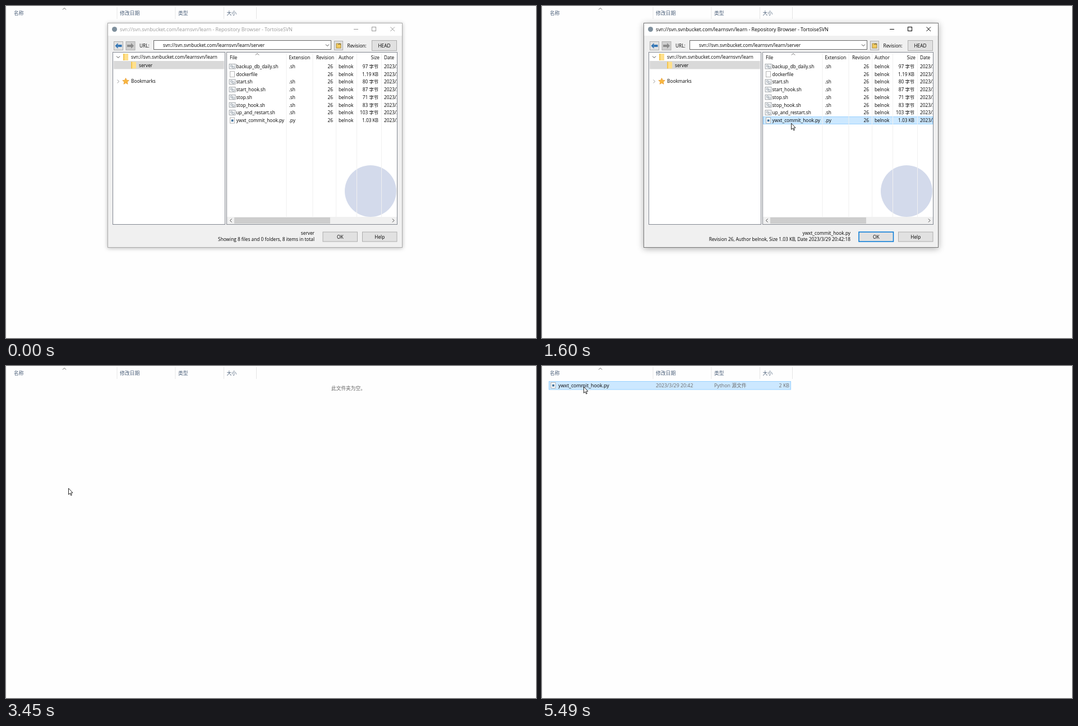
An HTML page with a canvas that plays this animation: 945x592 px, repeating every 5570 ms.

```html
<!DOCTYPE html>
<html lang="zh">
<head>
<meta charset="utf-8">
<style>
  html, body { margin: 0; width: 100%; height: 100%; overflow: hidden; background: #fefefe; }
  canvas { display: block; }
</style>
</head>
<body>
<canvas id="stage" width="945" height="592"></canvas>
<script>
const ctx = document.getElementById('stage').getContext('2d');
const LOOP = 5570, STEP = 76;
const ACTIVATE = 1210, RELEASE = 1370, GRAB = 2210, DRAG = 2380, DROP = 3450, COPIED = 3770;
const FONT = '"Open Sans", "Noto Sans CJK SC", "Noto Sans CJK", sans-serif';
const DIALOG = 8.3, SYSTEM = 8.8;
const ROW_TOP = 197, ROW_HEIGHT = 13.72;

const REPO = 'svn://svn.svnbucket.com/learnsvn/learn';
const AUTHOR = 'belnok';
const FILES = [
  ['backup_db_daily.sh', '97 字节'], ['dockerfile', '1.19 KB'],
  ['start.sh', '80 字节'], ['start_hook.sh', '87 字节'],
  ['stop.sh', '71 字节'], ['stop_hook.sh', '83 字节'],
  ['up_and_restart.sh', '103 字节'], ['ywxt_commit_hook.py', '1.03 KB']
].map(([name, size]) => ({ name, size, ext: (name.match(/\.\w+$/) || [''])[0] }));
const DRAGGED = FILES[FILES.length - 1].name;
const COLUMNS = [
  { title: 'File', width: 105.5, inset: 16.5, cell: f => f.name },
  { title: 'Extension', width: 47, cell: f => f.ext },
  { title: 'Revision', width: 41.5, align: 'right', cell: () => '26' },
  { title: 'Author', width: 37, cell: () => AUTHOR },
  { title: 'Size', width: 44, align: 'right', cell: f => f.size },
  { title: 'Date', width: 30, cell: () => '2023/3/29 20:42:18' }
];

// Each move leaves from where the one before ended; sway bows it sideways.
const MOVES = [
  { start: 230, end: 760, to: [458, 241] },
  { start: 840, end: 1060, to: [429, 208] },
  { start: 1440, end: 1980, to: [427, 207], sway: [18.5, 1.7] },
  { start: 2060, end: 2060, to: [427, 206] },
  { start: DRAG, end: 2820, to: [111, 219] },
  { start: DROP, end: DROP, to: [111, 218] },
  { start: COPIED, end: 4000, to: [161, 224] },
  { start: 4230, end: 4770, to: [63, 36], sway: [25, 8] },
  { start: 4850, end: 5340, to: [85, 48], sway: [38, 20] },
  { start: 5420, end: 5490, to: [74, 37] }
];
const ENTRY = [888, 595];

function pointerAt(t) {
  const index = MOVES.filter(m => m.start <= t).length - 1;
  if (index < 0) return null;
  const { start, end, to, sway = [0, 0] } = MOVES[index];
  const from = index ? MOVES[index - 1].to : ENTRY;
  const last = Math.round((end - start) / STEP);
  const step = last ? Math.min(last, Math.floor((t - start) / (end - start) * last + .03)) : 0;
  const u = (step + 1) / (last + 1), eased = u * u * (3 - 2 * u);
  return to.map((goal, k) =>
    Math.round(from[k] + (goal - from[k]) * eased + sway[k] * Math.sin(Math.PI * eased)));
}

function rect(x, y, w, h, fill, stroke, width = 1) {
  if (fill) { ctx.fillStyle = fill; ctx.fillRect(x, y, w, h); }
  if (stroke) { ctx.strokeStyle = stroke; ctx.lineWidth = width; ctx.strokeRect(x, y, w, h); }
}
function poly(points, stroke, fill, width = 1) {
  ctx.beginPath();
  points.forEach(([x, y]) => ctx.lineTo(x, y));
  if (fill) { ctx.closePath(); ctx.fillStyle = fill; ctx.fill(); }
  if (stroke) { ctx.strokeStyle = stroke; ctx.lineWidth = width; ctx.stroke(); }
}
function circle(x, y, r, fill, stroke) {
  ctx.beginPath();
  ctx.arc(x, y, r, 0, 7);
  if (fill) { ctx.fillStyle = fill; ctx.fill(); }
  if (stroke) { ctx.strokeStyle = stroke; ctx.lineWidth = .8; ctx.stroke(); }
}
function plus(x, y, r, color, width) {
  poly([[x - r, y], [x + r, y]], color, null, width);
  poly([[x, y - r], [x, y + r]], color, null, width);
}
function text(str, x, y, { color = '#000', size = DIALOG, align = 'left' } = {}) {
  ctx.font = `${size}px ${FONT}`;
  ctx.textAlign = align;
  ctx.fillStyle = color;
  ctx.fillText(str, x, y + 3);
}
// Chevron pointing along (dx, dy).
function chevron(x, y, dx, dy, color = '#444', r = 3) {
  const h = r / 2;
  poly([[x - dx * h - dy * r, y - dy * h - dx * r], [x + dx * h, y + dy * h],
        [x - dx * h + dy * r, y - dy * h + dx * r]], color);
}
function button(label, x, y, w, h, isDefault) {
  rect(x, y, w, h, '#e1e1e1', isDefault ? '#0078d7' : '#adadad', isDefault ? 1.5 : 1);
  text(label, x + w / 2, y + h / 2, { align: 'center' });
}
function folder(x, y) {
  rect(x, y - 6, 9, 12, '#ffe08c');
  rect(x, y - 6, 2, 12, '#f3c54f');
}
function fileIcon(name, x, y) {
  if (name.endsWith('.sh')) {
    rect(x - .5, y - 4.5, 11, 8.5, '#f4f6f7', '#8c9196', .8);
    circle(x + 3.5, y - 1, 1.6, null, '#87929d');
    circle(x + 6.7, y + 1.2, 1.8, null, '#87929d');
  } else {
    rect(x + 1, y - 5, 8, 10, '#fff', '#a0a0a0', .8);
    if (name.endsWith('.py')) rect(x + 3.2, y - 1.7, 3.8, 3.8, '#42749f');
  }
}
// Arrow button; dir is 1 for left and -1 for right.
function arrowButton(x, dir, back, color) {
  rect(x - 8, 63.5, 16, 15, back, '#adadad');
  poly([[x - 6 * dir, 71], [x - dir, 66], [x - dir, 76]], null, color);
  rect(x - (dir > 0 ? 1 : 6), 69, 7, 4, color);
}
function star(x, y, r) {
  poly(Array.from({ length: 10 }, (_, i) => {
    const angle = (i / 5 - .5) * Math.PI, reach = i % 2 ? r * .47 : r;
    return [x + reach * Math.cos(angle), y + reach * Math.sin(angle)];
  }), '#e89a2e', '#f9b73e', .8);
}

function drawExplorer(t) {
  rect(0, 0, 945, 592, '#fefefe');
  rect(0, 0, 1, 592, '#f3f3f3');
  const header = (label, x) => {
    rect(x - 5.5, 2, 1, 21, '#e5e5e5');
    text(label, x, 13, { color: '#4c607a', size: SYSTEM });
  };
  text('名称', 14, 13, { color: '#4c607a', size: SYSTEM });
  header('修改日期', 203);
  header('类型', 307);
  header('大小', 393.5);
  header('', 451.5);
  chevron(104, 5, 0, -1, '#666');
  if (t < COPIED) {
    text('此文件夹为空。', 580, 40, { color: '#666', size: 8.7 });
    return;
  }
  const grey = { color: '#6d6d6d', size: SYSTEM };
  rect(12.5, 27.5, 431, 14.5, '#cce8ff', '#99d1ff');
  fileIcon(DRAGGED, 15, 34.5);
  text(DRAGGED, 29, 34.5, { size: SYSTEM });
  text('2023/3/29 20:42', 203, 34.5, grey);
  text('Python 源文件', 307, 34.5, grey);
  text('2 KB', 441, 34.5, { ...grey, align: 'right' });
}

function drawFrame(active) {
  ctx.save();
  ctx.shadowColor = active ? 'rgba(0,0,0,.32)' : 'rgba(0,0,0,.28)';
  ctx.shadowBlur = active ? 11 : 7;
  ctx.shadowOffsetY = active ? 2 : 1;
  rect(181, 30, 526, 401, '#f0f0f0');
  ctx.restore();
  rect(181.5, 30.5, 525, 400, '#f0f0f0', active ? '#777' : '#aaa');
  rect(182, 31, 524, 22, '#fff');
  const ink = active ? '#000' : '#999';
  circle(193.5, 41.5, 4.5, '#7e8f9c');
  text(`${REPO} - Repository Browser - TortoiseSVN`, 203, 41.5, { color: ink, size: SYSTEM });
  poly([[620, 41.5], [628, 41.5]], ink);
  rect(652.5, 37.5, 7, 7, null, ink);
  poly([[685.5, 37.5], [693, 45]], ink);
  poly([[693, 37.5], [685.5, 45]], ink);
}

function drawToolbar() {
  arrowButton(200.5, 1, '#e1e1e1', '#3476b5');
  arrowButton(222, -1, '#cfcfcf', '#8c8c8c');
  text('URL:', 238, 70.5);
  rect(263.5, 61.5, 316, 16, '#fff', '#666');
  text(REPO + '/server', 280, 70);
  chevron(573, 70, 0, 1);
  rect(585.5, 62.5, 15, 16, '#e1e1e1', '#adadad');
  rect(589, 67, 8, 8, '#f2cb60', '#9b7a25', .8);
  chevron(594.5, 68, 0, -1, '#333', 2);
  text('Revision:', 608.5, 70.5);
  button('HEAD', 652.5, 61.5, 44, 18);
}

function drawTree() {
  rect(190.5, 82.5, 200, 307, '#fff', '#828790');
  rect(192, 98, 197, 14.5, '#d9d9d9');
  chevron(200, 91, 0, 1);
  folder(209, 91);
  text(REPO, 223, 91);
  folder(223, 105.5);
  text('server', 237, 105.5);
  chevron(200, 134.5, 1, 0, '#999');
  star(213.5, 134.5, 6);
  text('Bookmarks', 223, 134);
}

function drawColumn({ title, width, align, inset = 5, cell }, left) {
  const right = left + width;
  rect(right, 84, 1, 292, '#f0f0f0');
  text(title, align ? right - 3 : left + 5, 92, { align });
  FILES.forEach((file, i) =>
    text(cell(file), align ? right - 5 : left + inset, 108 + i * ROW_HEIGHT, { align }));
}
function drawList(rowFill, rowEdge) {
  rect(393.5, 82.5, 304, 307, '#fff', '#828790');
  ctx.save();
  ctx.beginPath();
  ctx.rect(394, 83, 303, 306);
  ctx.clip();
  circle(650, 330, 46, '#d3daeb');
  if (rowFill) rect(394.5, ROW_TOP + .5, 302, 13, rowFill, rowEdge);
  chevron(448, 86, 0, -1, '#666');
  let left = 394;
  for (const column of COLUMNS) {
    drawColumn(column, left);
    left += column.width;
  }
  FILES.forEach(({ name }, i) => fileIcon(name, 398.5, 108 + i * ROW_HEIGHT));
  rect(394, 376, 303, 13, '#f0f0f0');
  rect(407, 377, 171, 11, '#cdcdcd');
  chevron(401, 382.5, -1, 0);
  chevron(690.5, 382.5, 1, 0);
  ctx.restore();
}

function drawBrowser(t, pointer) {
  const active = t >= ACTIVATE;
  const hovered = pointer && pointer[1] >= ROW_TOP && pointer[1] < ROW_TOP + ROW_HEIGHT;
  drawFrame(active);
  drawToolbar();
  drawTree();
  drawList(active ? '#cce8ff' : hovered ? '#e5f3ff' : null,
           active && t < DRAG ? '#99d1ff' : null);
  const right = { align: 'right' };
  text(active ? DRAGGED : 'server', 550, 405, right);
  text(active ? `Revision 26, Author ${AUTHOR}, Size 1.03 KB, Date 2023/3/29 20:42:18`
              : 'Showing 8 files and 0 folders, 8 items in total', 550, 415.5, right);
  button('OK', 565, 403, 61.5, 17, active);
  button('Help', 635.5, 403, 61.5, 17);
}

function drawGlow() {
  const glow = ctx.createRadialGradient(0, 0, 0, 0, 0, 8.5);
  glow.addColorStop(0, 'rgba(250,240,20,.8)');
  glow.addColorStop(1, 'rgba(255,248,60,.6)');
  circle(0, 0, 8.5, glow);
}
function drawGhost() {
  ctx.globalAlpha = .55;
  fileIcon(DRAGGED, -28.5, -2.5);
  text(DRAGGED, -16.5, -2.5);
  ctx.globalAlpha = 1;
}
function drawDropTip() {
  rect(8.5, 9.5, 62, 13, '#fff', '#b5b5b5');
  plus(16.5, 16, 2.5, '#1f4e9e', 1.6);
  text('复制到 test', 22, 16, { color: '#003399', size: SYSTEM });
  rect(7.5, 12.5, 8, 8, '#fff', '#222');
  plus(11.5, 16.5, 2.5, '#000');
}
function drawPointer(t, [x, y]) {
  const pressed = t >= ACTIVATE && t < RELEASE || t >= GRAB && t < DROP;
  const dragging = t >= DRAG && t < DROP;
  ctx.save();
  ctx.translate(x, y);
  if (dragging) drawGhost();
  if (pressed) drawGlow();
  if (dragging && x < 181) drawDropTip();
  poly([[.5, 0], [.5, 11.2], [3, 8.9], [4.8, 12.8], [6.4, 12.1], [4.7, 8.3], [8, 8.1], [.5, 0]],
       '#111', '#fff', .9);
  ctx.restore();
}

const begin = performance.now();
function tick() {
  const t = (performance.now() - begin) % LOOP;
  const pointer = pointerAt(t);
  drawExplorer(t);
  if (t < DROP) drawBrowser(t, pointer);
  if (pointer) drawPointer(t, pointer);
  requestAnimationFrame(tick);
}
tick();
</script>
</body>
</html>
```
